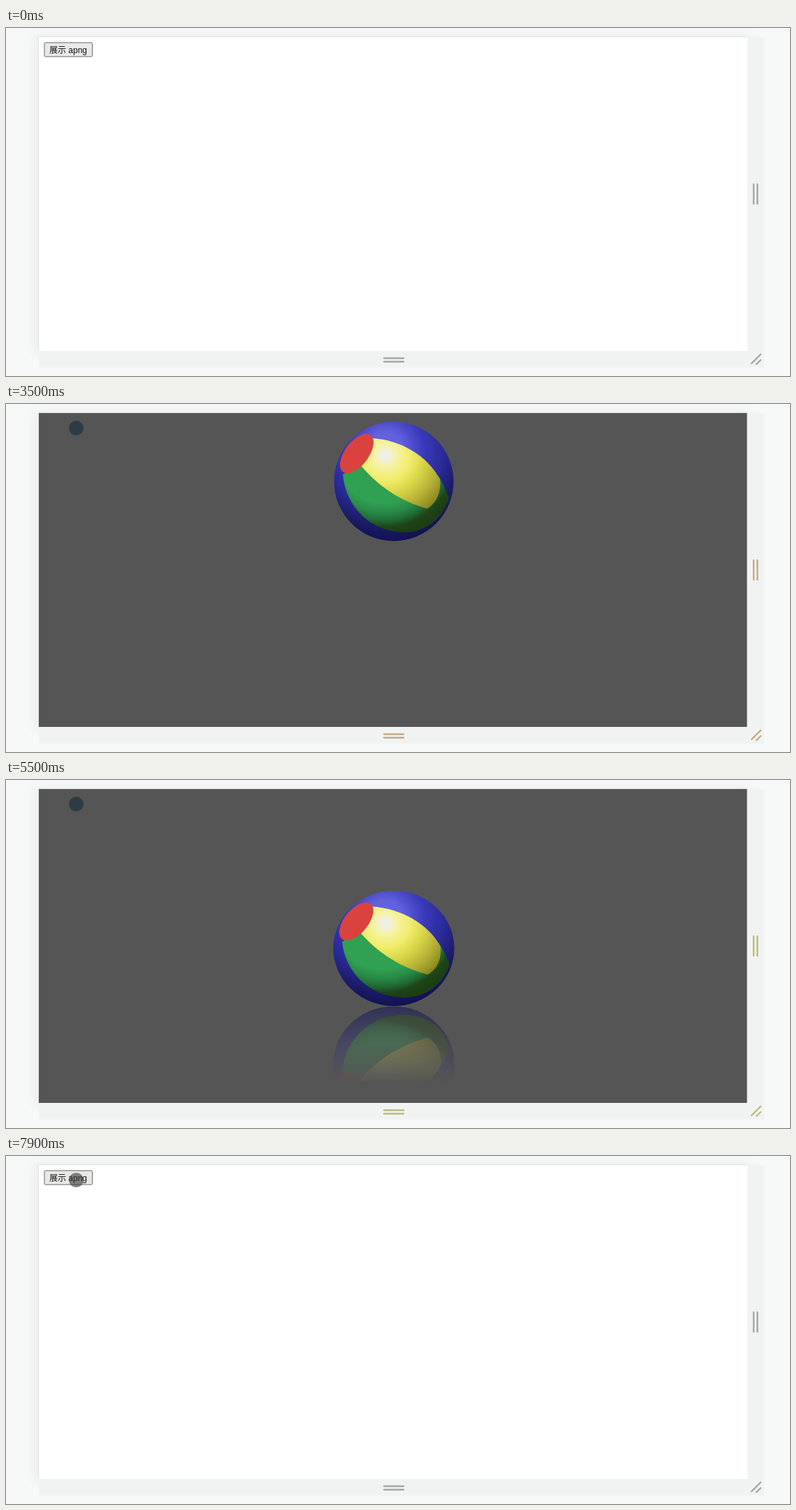
Write an HTML page that moves like this. It is 1122x499 px and loops after 8 s.

```html
<!DOCTYPE html>
<html lang="zh">
<head>
<meta charset="utf-8">
<title>Bouncing ball preview</title>
<style>
  html, body { margin: 0; width: 100%; height: 100%; overflow: hidden; background: #f7f9f8; }
  svg { display: block; }
  text { font: 12px "Liberation Sans", "Noto Sans CJK SC", "Noto Sans CJK", sans-serif; fill: #111; }
</style>
</head>
<body>
<svg width="1122" height="499" viewBox="0 0 1122 499">
  <defs>
    <filter id="soft" x="-5%" y="-10%" width="110%" height="120%"><feGaussianBlur stdDeviation="7"/></filter>
    <radialGradient id="blue" gradientUnits="userSpaceOnUse" cx="-12" cy="-46" r="135">
      <stop offset=".18" stop-color="#6262de"/>
      <stop offset=".4" stop-color="#3a3abb"/>
      <stop offset=".62" stop-color="#2a2a98"/>
      <stop offset=".82" stop-color="#1b1b66"/>
      <stop offset="1" stop-color="#101050"/>
    </radialGradient>
    <radialGradient id="green" gradientUnits="userSpaceOnUse" cx="-15" cy="-38" r="115">
      <stop offset=".6" stop-color="#30a052"/>
      <stop offset=".72" stop-color="#298a47"/>
      <stop offset=".82" stop-color="#216a35"/>
      <stop offset=".9" stop-color="#1e4518"/>
      <stop offset="1" stop-color="#1d3d14"/>
    </radialGradient>
    <radialGradient id="yellow" gradientUnits="userSpaceOnUse" cx="-12" cy="-37" r="100">
      <stop offset=".06" stop-color="#efefe4"/>
      <stop offset=".16" stop-color="#f6f3a4"/>
      <stop offset=".36" stop-color="#f0ec6a"/>
      <stop offset=".55" stop-color="#d9d548"/>
      <stop offset=".76" stop-color="#b5b136"/>
      <stop offset="1" stop-color="#837f1c"/>
    </radialGradient>
    <linearGradient id="fade" gradientUnits="userSpaceOnUse" x1="0" y1="322" x2="0" y2="434">
      <stop stop-color="#fff" stop-opacity=".55"/>
      <stop offset="1" stop-color="#fff" stop-opacity="0"/>
    </linearGradient>
    <mask id="mirror" maskUnits="userSpaceOnUse" x="400" y="322" width="320" height="141">
      <rect x="400" y="322" width="320" height="141" fill="url(#fade)"/>
    </mask>
  </defs>

  <rect width="1122" height="499" fill="#f7f9f8"/>
  <rect x="40" y="10" width="1026" height="456" fill="#eceeed" filter="url(#soft)"/>
  <rect x="47" y="13" width="1038" height="474" fill="#f1f3f2"/>
  <rect x="47" y="13" width="1014" height="450" fill="#fff"/>
  <path d="M46.5 463V12.5H1061" fill="none" stroke="#dce2e0"/>
  <g id="grips" stroke-width="2.4" stroke-linecap="round">
    <path d="M1070 224V252M1075.3 224V252M541 473.5H569M541 478.5H569M1067 481L1080 468M1074 482L1080 476"/>
  </g>

  <rect x="55" y="21" width="68.5" height="20" rx="1.5" fill="#e9e9e7" stroke="#666"/>
  <text x="62" y="35.5">展示 apng</text>

  <g id="overlay">
    <rect x="47" y="13" width="1013.5" height="450" fill="#555"/>
    <g mask="url(#mirror)"><use href="#ball" transform="translate(0 648.5) scale(1 -1)"/></g>
    <g id="ball">
      <circle r="85.5" fill="url(#blue)"/>
      <path fill="url(#green)" d="M-73-10C-68 40-30 73 15 73C48 73 72 50 79 23Q74 10 64-8L-47-24Z"/>
      <path fill="url(#yellow)" d="M-50-20Q-36-38-32-62C10-60 49-36 66-3C68 15 62 30 48 39C10 29-25 5-47-23Z"/>
      <ellipse cx="-53" cy="-40" rx="33" ry="17" transform="rotate(-53 -53 -40)" fill="#da423e"/>
    </g>
  </g>
  <circle id="pointer" cx="100.5" cy="34.5" r="10.5"/>
</svg>
<script>
const LOOP = 8000, OPEN = 2000, CLOSE = 7700, POINTER = 1000;
const FLOOR = 324, RADIUS = 85.5, APEX = 111, CONTACT = 0.42;
// Playback is uneven: [time, bounce cycles completed]
const pace = [[2000, 0], [2600, 0.42], [3500, 1], [5000, 2.3], [6300, 3], [7400, 3.58], [8000, 4]];
const el = id => document.getElementById(id);

function cyclesAt(t) {
  const i = Math.max(1, pace.findIndex(p => p[0] >= t));
  const [t0, c0] = pace[i - 1], [t1, c1] = pace[i];
  return c0 + (c1 - c0) * (t - t0) / (t1 - t0);
}

function pose(cycles) {
  const u = cycles % 1, fromApex = Math.min(u, 1 - u);
  if (fromApex < CONTACT) {
    const k = fromApex / CONTACT;
    return { y: APEX + (FLOOR - RADIUS - APEX) * k * k, sx: 1, sy: 1 - 0.06 * Math.sin(Math.PI * k) };
  }
  const press = Math.sin(Math.PI * (u - CONTACT) / (1 - 2 * CONTACT));
  const sy = 1 - 0.16 * press;
  return { y: FLOOR - RADIUS * sy, sx: 1 + 0.06 * press, sy };
}

function gripColor(y) {
  return y < 140 ? '#c4aa8a' : y < 205 ? '#776fc6' : '#bcbc7c';
}

function draw(now) {
  const t = Math.floor(now % LOOP / 100) * 100;
  const open = t >= OPEN && t < CLOSE;
  const { y, sx, sy } = pose(cyclesAt(Math.max(t, OPEN)));
  el('overlay').style.display = open ? '' : 'none';
  el('ball').setAttribute('transform', `translate(555 ${y}) scale(${sx} ${sy})`);
  el('grips').setAttribute('stroke', open ? gripColor(y) : '#a6a6a4');
  el('pointer').style.display = t < POINTER ? 'none' : '';
  el('pointer').setAttribute('fill', open ? '#2d3c44' : 'rgba(60,60,60,.62)');
  requestAnimationFrame(draw);
}
draw(0);
</script>
</body>
</html>
```
